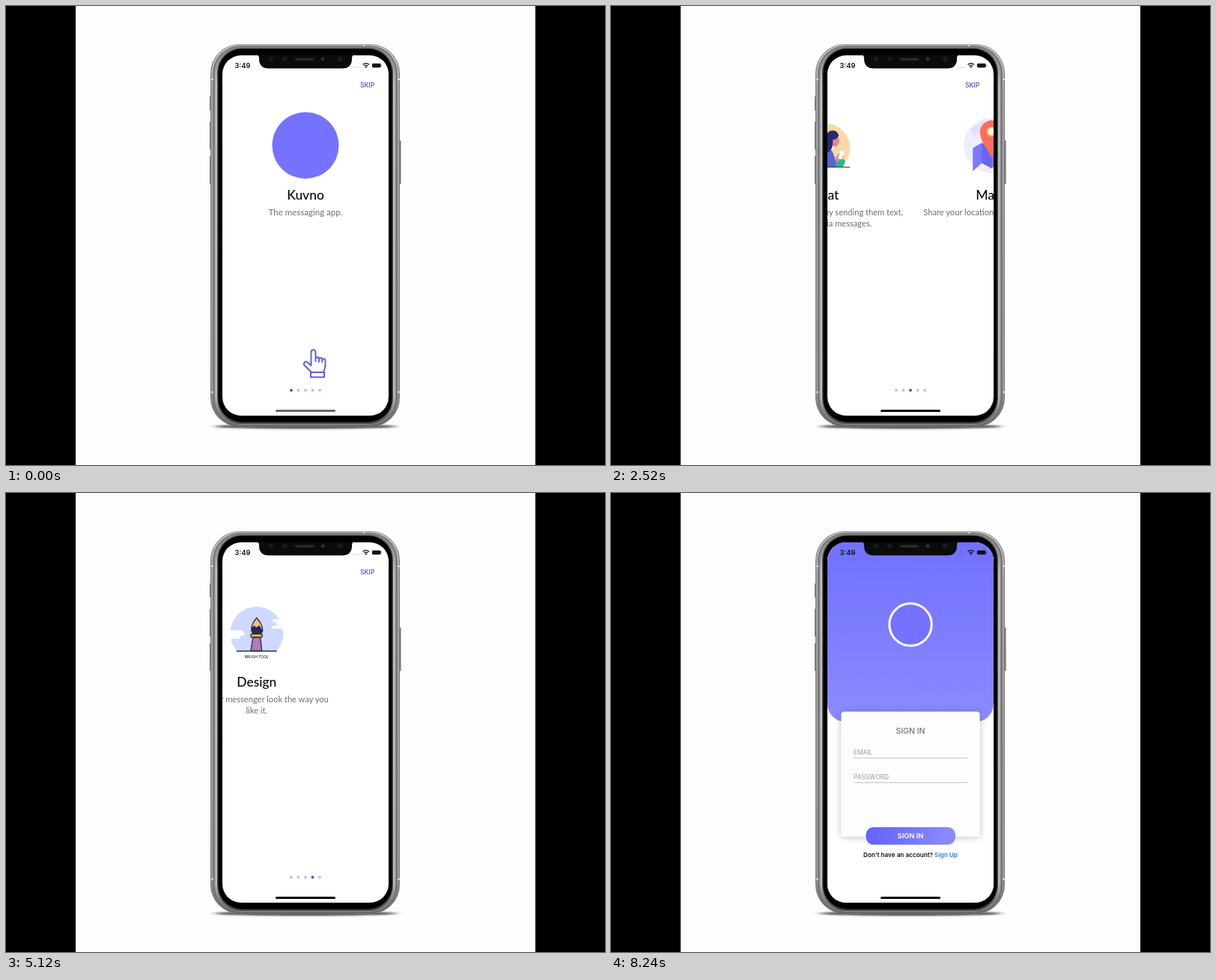
Recreate the animation shown at these times as an HTML page. Size 800 px wide and 614 px high, loop 8.28 s.

```html
<!DOCTYPE html>
<html lang="en">
<head>
<meta charset="utf-8">
<title>Onboarding</title>
<style>
  html, body { margin: 0; width: 100%; height: 100%; overflow: hidden; background: #000; }
  svg { display: block; width: 100%; height: 100%; }
  text { font-family: Inter, sans-serif; }
  .mid { text-anchor: middle; }
  .title, .sub, .brand { font-family: Lato, sans-serif; text-anchor: middle; }
  .title { font-size: 17.4px; font-weight: 500; fill: #080808; }
  .sub { font-size: 11.1px; font-weight: 500; fill: #777; }
  .brand { font-size: 29.5px; font-weight: 500; fill: #fff; }
  .label { font-size: 8.3px; fill: #999; }
</style>
</head>
<body>
<svg viewBox="0 0 800 614" preserveAspectRatio="none">
  <defs>
    <clipPath id="glass"><rect x="289" y="66" width="222" height="482" rx="25"/></clipPath>
    <clipPath id="sky"><path d="M-40 140h80v75.500h-80z"/></clipPath>
    <clipPath id="ground"><path d="M-40 140h80v71h-80z"/></clipPath>
    <linearGradient id="splashFill" x2="0" y2="1"><stop stop-color="#706fff"/><stop id="low" offset="1"/></linearGradient>
    <linearGradient id="headFill" x2="0" y2="1"><stop stop-color="#6f6eff"/><stop offset="1" stop-color="#8b8bff"/></linearGradient>
    <linearGradient id="btnFill"><stop stop-color="#6362ff"/><stop offset="1" stop-color="#8d8dff"/></linearGradient>
    <linearGradient id="metal" x2="0" y2="1"><stop stop-color="#c4c4c4"/><stop offset=".12" stop-color="#a4a4a4"/><stop offset=".9" stop-color="#999"/><stop offset="1" stop-color="#666"/></linearGradient>
    <linearGradient id="shine" x2="0" y2="1"><stop stop-color="#777"/><stop offset=".1" stop-color="#c2c2c2"/><stop offset=".93" stop-color="#bbb"/><stop offset="1" stop-color="#444"/></linearGradient>
    <filter id="soft" x="-20%" y="-200%" width="140%" height="500%"><feGaussianBlur stdDeviation="5 1"/></filter>
    <filter id="lift" x="-20%" y="-20%" width="140%" height="140%"><feDropShadow dx="0" dy="1" stdDeviation="5" flood-opacity=".25"/></filter>
  </defs>

  <rect width="800" height="614"/>
  <rect x="93" width="614" height="614" fill="#fdfdfd"/>

  <ellipse cx="400" cy="562.500" rx="122" ry="3" fill="#222" opacity=".8" filter="url(#soft)"/>
  <path d="M273 121v19M273 155v37M273 201v37M526.500 180v58" stroke="#777" stroke-width="2"/>
  <g id="body"></g>
  <path d="M274 98h3M523 98h3M274 516.500h3M523 516.500h3M478 52v2" stroke="#ddd" stroke-width="2"/>

  <g clip-path="url(#glass)">
    <rect x="289" y="66" width="222" height="482" fill="#fff"/>

    <g class="page">
      <circle cy="186.500" r="44.500" fill="#7472ff"/>
      <text class="title" y="259">Kuvno</text>
      <text class="sub" y="280" style="font-size:11.500px">The messaging app.</text>
    </g>

    <g class="page">
      <g clip-path="url(#sky)">
        <circle cy="190" r="33" fill="#fbd9a6"/>
        <path d="M-20 172L-6 205 12 190-12 165z" fill="#fdebcf"/>
        <path d="M-19 216C-34 206-37 194-31 191-23 189-16 197-15 216z" fill="#15a17c"/>
        <path d="M-31 194l14 20m-7-10l0-8m2 11l-9-2" stroke="#bdebd9" fill="none"/>
        <path d="M11 216c2-14 7-20 10-20s4 5 1 9c5-1 6 4 1 11z" fill="#2db58d"/>
        <ellipse cx="13" cy="180" rx="5.500" ry="8" fill="#ee8095"/>
        <path d="M-20 216c-1-14 9-24 20-27 9 1 13 9 14 27z" fill="#5a63d3"/>
        <path d="M13 203l9-5 3 4-10 7z" fill="#ee8095"/>
        <path d="M20 194l6-1-4 12-5-1z" fill="#fff" stroke="#ddd" stroke-width=".5"/>
        <path d="M18 173C15 164 4 165 1 173-2 181-8 180-11 187-17 190-21 196-19 203-12 207-4 200 0 197 10 195 10 186 10 179 13 179 16 177 18 173z" fill="#292b70"/>
      </g>
      <circle cx="-25.500" cy="168" r="10.500" fill="#fde6c1"/>
      <circle cx="-25.500" cy="168" r="7.500" fill="#f5a01c"/>
      <path d="M-34 215.500h67" stroke="#333"/>
      <text class="title" y="259">Chat</text>
      <text class="sub"><tspan x="0" y="280">Contact your friends by sending them text,</tspan><tspan x="0" y="295">audio or media messages.</tspan></text>
    </g>

    <g class="page">
      <circle cy="186.500" r="37" fill="#eeedfb"/>
      <path d="M-29 165l18-12 4 6-16 17zM20 155l12 12-8 6-10-12z" fill="#e2e1f8"/>
      <path d="M-25 190l12-7 13 8 13-8 13 7v31l-13-11-13 7-13-7-12 11z" fill="#7a78ff"/>
      <path d="M-13 183L0 191v26l-13-7zM13 183l13 7v31l-13-11z" fill="#6866ec"/>
      <path d="M0 203C-4 193-15.500 181-15.500 169a15.500 16 0 0 1 31 0C15.500 181 4 193 0 203z" fill="#ff6d5c"/>
      <circle cy="168" r="6.500" fill="#f8bf55"/><circle cy="168" r="4.500" fill="#fff"/>
      <text class="title" y="259">Maps</text>
      <text class="sub" y="280">Share your location with your friends.</text>
    </g>

    <g class="page">
      <circle cy="187.500" r="35.500" fill="#cfd9ff" clip-path="url(#ground)"/>
      <path d="M-38 185.500h18M-38 189h20M-38 193h14M23 171h16M28 175h12M22 179.500h17" stroke="#fff" stroke-width="4" stroke-linecap="round"/>
      <g stroke="#262c4f" stroke-width="1.300" stroke-linejoin="round">
        <path d="M-5 193l-3 18.500H7L5 193z" fill="#a979b7"/>
        <path d="M0 167C-4 172-8 177-7 184q1 4 4 4H4q3 0 4-4C8 177 4 172 0 167z" fill="#f8b98a"/>
        <path d="M-7 181l4-3 2 3 4-3 3 4 1 3-3 3h-8z" fill="#262c4f"/>
        <rect x="-8" y="188.500" width="15.500" height="4.500" rx="2" fill="#f3b33f"/>
        <path d="M-27 211.500h54"/>
      </g>
      <path d="M-4 197l6 11m-3-12l4 8m-8-2l4 7" stroke="#dfb5dc" stroke-width=".8" stroke-dasharray="1 1"/>
      <text class="mid" y="221" font-size="5" fill="#222" font-weight="500">BRUSH TOOL</text>
      <text class="title" y="259">Design</text>
      <text class="sub"><tspan x="0" y="280">Make your messenger look the way you</tspan><tspan x="0" y="295">like it.</tspan></text>
    </g>

    <path id="hand" fill="none" stroke="#5f5edf" stroke-width="2" stroke-linejoin="round" stroke-linecap="round"
      d="M407.500 481V463a3 3 0 0 1 6 0v12m0-3a2.200 2.200 0 0 1 4.400 0v4m0-3a2.200 2.200 0 0 1 4.400 0v3m0-2a2.100 2.100 0 0 1 4.200 0v7c0 4-2 5-2 8M407.500 481l-5-4.500c-3-2-6 1-4 4l9 9M407 490h18v6.500h-18z"/>
    <g id="dots"></g>
    <text x="473" y="108.500" font-size="8.500" font-weight="500" fill="#4b49d0">SKIP</text>

    <g id="splash">
      <rect x="289" y="66" width="222" height="482" fill="url(#splashFill)"/>
      <circle id="mark" cx="400" fill="#7472ff"/>
      <text class="brand" id="brand" x="400" y="408">Kuvno</text>
    </g>

    <g id="login">
      <rect x="289" y="66" width="222" height="482" fill="#fff"/>
      <rect x="289" y="40" width="222" height="266" rx="24" fill="url(#headFill)"/>
      <circle cx="400" cy="176" r="28.200" fill="#7472ff" stroke="#fff" stroke-width="3"/>
      <rect x="307.500" y="292.500" width="185" height="167" rx="4" fill="#fdfdfd" filter="url(#lift)"/>
      <text class="mid" x="400" y="322" font-size="10.500" font-weight="500" fill="#737373">SIGN IN</text>
      <text class="label" x="324" y="350">EMAIL</text>
      <text class="label" x="324" y="383">PASSWORD</text>
      <path d="M324 354.500h152M324 387.500h152" stroke="#c6c6c6"/>
      <text class="mid" x="400" y="487" font-size="8.200" font-weight="600" fill="#111">Don't have an account? <tspan fill="#2b78e4">Sign Up</tspan></text>
    </g>
    <g id="button">
      <rect x="340.500" y="447" width="119.500" height="23.500" rx="10" fill="url(#btnFill)"/>
      <text class="mid" x="400" y="462.300" font-size="9.400" font-weight="600" fill="#fff">SIGN IN</text>
    </g>

    <text class="mid" x="316" y="83" font-size="9.200" font-weight="600" fill="#111">3:49</text>
    <path d="M463.500 82h10" stroke="#000" stroke-opacity=".25" stroke-width="1.200" stroke-dasharray="1.500 1.300"/>
    <path d="M476.500 78.500q4.300-3.600 8.600 0M478.200 80.300q2.600-2 5.200 0" fill="none" stroke="#111" stroke-width="1.300"/>
    <circle cx="480.800" cy="81.800" r="1"/>
    <rect x="489" y="77" width="11.500" height="5.200" rx="1.400" fill="#111" stroke="#000" stroke-opacity=".4" stroke-width=".6"/>
    <path d="M502 78.500v2.200" stroke="#000" stroke-opacity=".4"/>
    <rect id="bar" x="360" y="540" width="80" height="3" rx="1.500"/>
  </g>

  <path d="M334 65.500q4 0 4 4v1q0 13 13 13h98q13 0 13-13v-1q0-4 4-4z" fill="#0b0b0b"/>
  <rect x="386" y="69.500" width="25" height="3.500" rx="1.700" fill="#2a2a2a"/>
  <g fill="#1b1b1d"><circle cx="354" cy="71" r="3"/><circle cx="372" cy="71" r="3"/><circle cx="446" cy="71" r="3.500"/></g>
  <circle cx="423" cy="71" r="2.500" fill="#303033"/>
</svg>

<script>
const $ = id => document.getElementById(id);
const LOOP = 8280, PAGE = 222, SLIDE = 850;
const starts = [990, 2340, 3690, 5028];
const pages = [...document.querySelectorAll('.page')];

// Nested rims of the phone: inset and fill
const rims = [[0, '#7c7c7c'], [1, 'url(#metal)'], [3.5, '#6c6c6c'], [5, '#8e8e8e'], [6.5, 'url(#shine)'], [9, '#484848'], [10.5, '#000']];
$('body').innerHTML = rims.map(([d, fill]) => {
  const dy = d * .6;
  return `<rect x="${273 + d}" y="${51 + dy}" width="${253 - 2 * d}" height="${512 - 2 * dy}" rx="${39 - d * .7}" fill="${fill}"/>`;
}).join('');
$('dots').innerHTML = [0, 1, 2, 3, 4].map(i => `<circle cx="${381 + 9.5 * i}" cy="514" r="2.1"/>`).join('');
const dots = [...$('dots').children];

const ramp = (t, a, b) => Math.min(1, Math.max(0, (t - a) / (b - a)));
const easeOut = x => 1 - (1 - x) ** 3;
const mix = (a, b, k) => Math.round(a + (b - a) * k);
const fade = (id, k) => $(id).setAttribute('opacity', k);

function draw(t) {
  const scroll = starts.reduce((sum, s) => sum + easeOut(ramp(t, s, s + SLIDE)), 0);
  pages.forEach((p, i) => p.setAttribute('transform', `translate(${400 + (i - scroll) * PAGE} 0)`));
  dots.forEach((d, i) => d.setAttribute('fill', i === Math.round(scroll) ? '#5a58d8' : '#c2c2f4'));

  const swipe = ramp(t, 0, 700);
  $('hand').setAttribute('transform', `translate(${-42 * swipe * swipe * (3 - 2 * swipe) - scroll * PAGE} 0)`);
  fade('hand', 1 - ramp(t, 680, 880));

  // The home bar greys on each new screen, then settles to black
  const grey = t < 5720 ? mix(105, 0, ramp(t, 0, 500)) : mix(70, 0, ramp(t, 6000, 6500));
  $('bar').setAttribute('fill', `rgb(${grey},${grey},${grey})`);

  fade('splash', ramp(t, 5720, 5860));
  const c = mix(97, 140, ramp(t, 6000, 7400));
  $('low').setAttribute('stop-color', `rgb(${c},${c},255)`);
  const rise = easeOut(ramp(t, 6000, 6700));
  $('mark').setAttribute('cy', 307 - 7 * rise);
  $('mark').setAttribute('r', 59 * easeOut(ramp(t, 5760, 5980)) - 1.5 * rise);
  fade('mark', ramp(t, 5760, 6000));
  fade('brand', ramp(t, 6600, 7000));

  fade('login', ramp(t, 7705, 8105));
  fade('button', ramp(t, 7560, 7700));
}

const begin = performance.now();
function tick() {
  draw((performance.now() - begin) % LOOP);
  requestAnimationFrame(tick);
}
tick();
</script>
</body>
</html>
```
